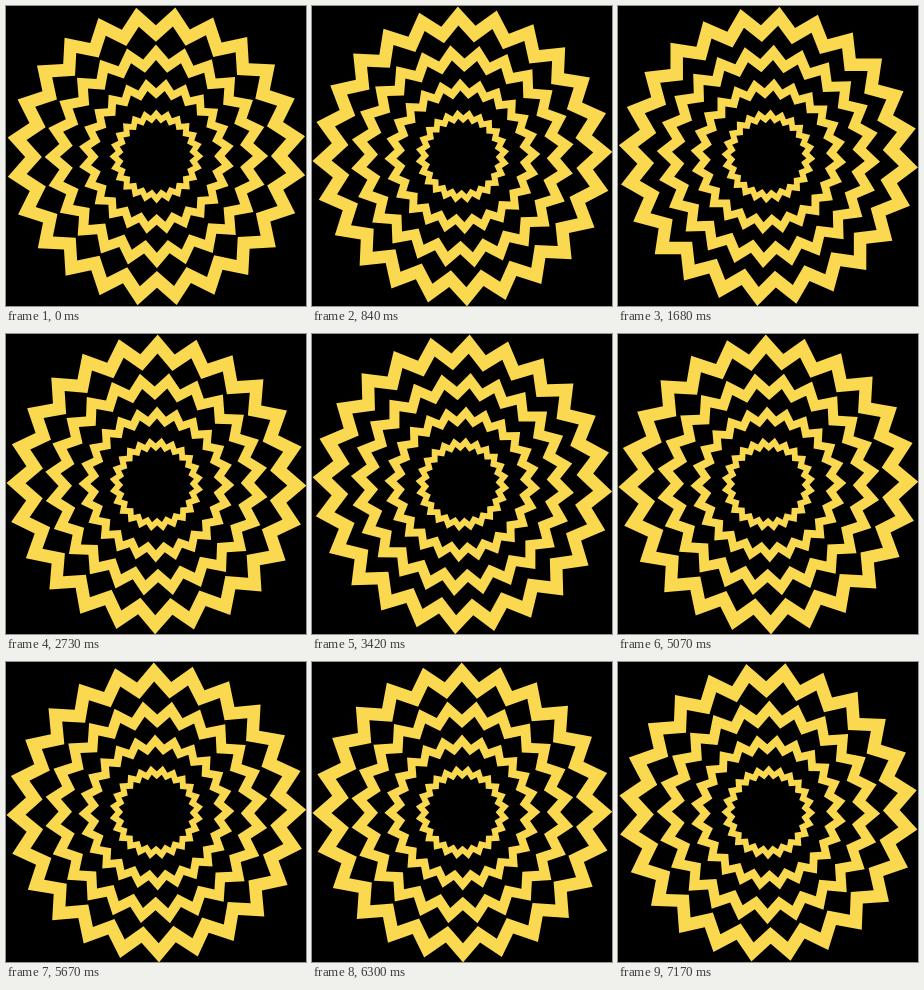
Recreate the animation shown at these times as an HTML page. Size 300 px wide and 300 px high, loop 7200 ms.

```html
<!DOCTYPE html>
<html lang="en">
<head>
<meta charset="utf-8">
<title>Counter-rotating zigzag rings</title>
<style>
  html, body { margin: 0; width: 100%; height: 100%; overflow: hidden; background: #000; }
  svg { display: block; width: 100vw; height: 100vh; }
</style>
</head>
<body>
<svg id="stage" viewBox="0 0 300 300"></svg>
<script>
const LOOP = 7200, FRAME = 30, TEETH = 24, STEP = 360 / TEETH;
const TURN = 180; // degrees per loop
const TILT = -0.25;
const CENTER = 150.4;
const RADII = [150, 111.8, 78, 47];
const NOTCH = 0.875;
const stage = document.getElementById('stage');

// Smaller rings are relatively thicker.
const thickness = radius => 4.4 + 0.098 * radius;

// Closed zigzag with a tip pointing straight up.
function zigzag(tip) {
  const points = Array.from({ length: TEETH * 2 }, (_, i) => {
    const angle = i * Math.PI / TEETH;
    const r = i % 2 ? tip * NOTCH : tip;
    return `${(r * Math.sin(angle)).toFixed(2)},${(-r * Math.cos(angle)).toFixed(2)}`;
  });
  return `M${points.join('L')}Z`;
}

const rings = RADII.map((radius, i) => {
  const path = document.createElementNS('http://www.w3.org/2000/svg', 'path');
  path.setAttribute('d', zigzag(radius) + zigzag(radius - thickness(radius)));
  path.setAttribute('fill', '#fad850');
  path.setAttribute('fill-rule', 'evenodd');
  stage.append(path);
  const even = i % 2 === 0;
  return { path, start: TILT - (even ? STEP / 2 : 0), direction: even ? 1 : -1 };
});

function draw(ms) {
  const time = Math.floor((ms % LOOP) / FRAME) * FRAME;
  for (const { path, start, direction } of rings) {
    const angle = start + direction * TURN * time / LOOP;
    path.setAttribute('transform', `translate(${CENTER} ${CENTER}) rotate(${angle})`);
  }
}

const origin = performance.now();
function tick() {
  draw(performance.now() - origin);
  requestAnimationFrame(tick);
}
draw(0);
requestAnimationFrame(tick);
</script>
</body>
</html>
```
